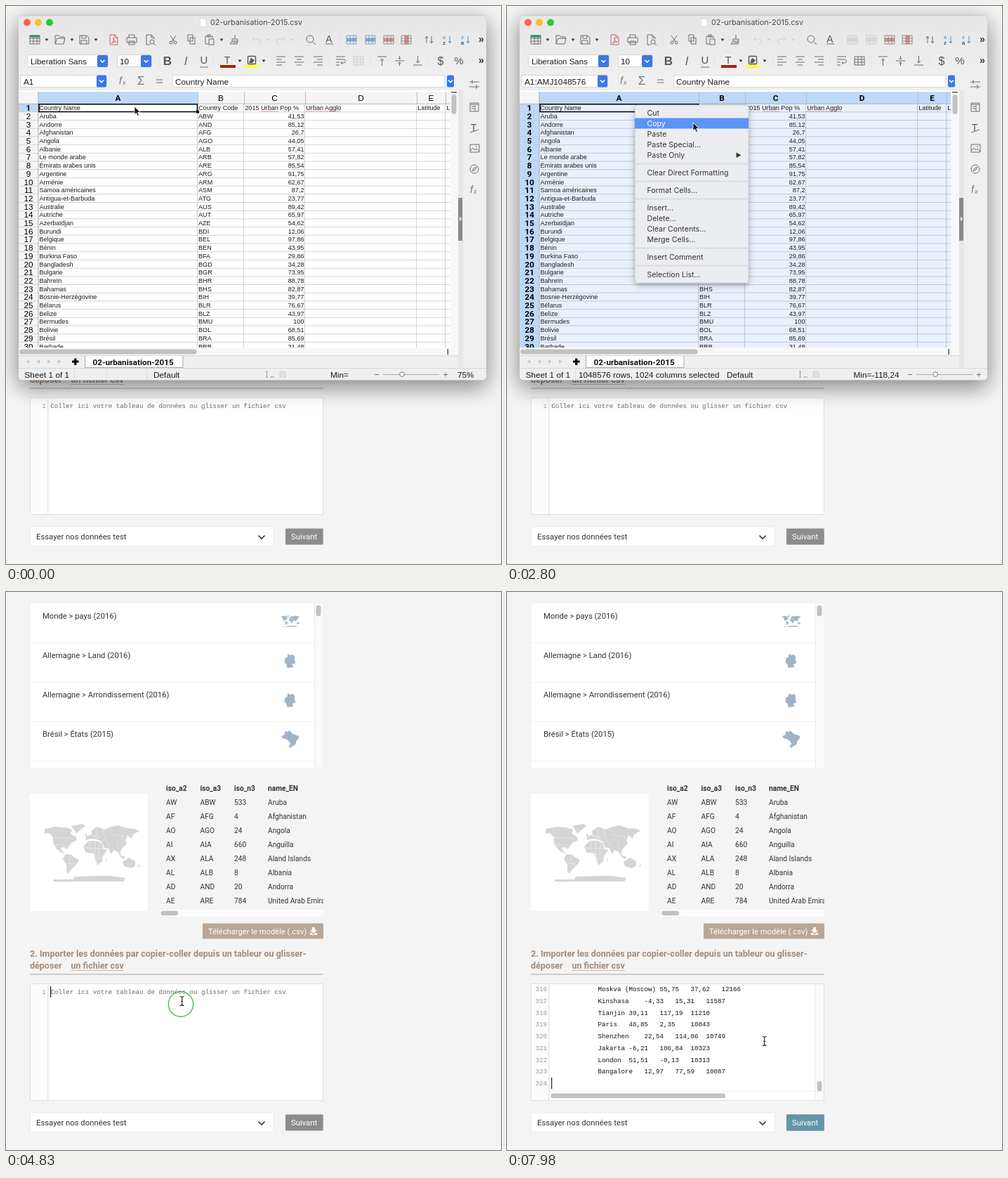
Recreate the animation shown at these times as an HTML page. Size 705 by 794 pixels, loop 8000 ms.

```html
<!DOCTYPE html>
<html lang="fr">
<head>
<meta charset="utf-8">
<title>Copier-coller un tableau</title>
<style>
html, body { margin: 0; width: 100%; height: 100%; overflow: hidden; background: #f4f4f4; }
svg { display: block; width: 705px; height: 794px; }
text { white-space: pre; }
.l { font-family: "Liberation Sans", Arial, sans-serif; }
.r { font-family: Roboto, sans-serif; }
.i { font-family: Inter, sans-serif; }
.m { font-family: "Liberation Mono", monospace; }
.b { font-weight: 700; }
.mid { text-anchor: middle; }
.end { text-anchor: end; }
.win { filter: drop-shadow(0 9px 16px rgba(0,0,0,.38)) drop-shadow(0 0 .6px rgba(0,0,0,.35)); }
.menu { filter: drop-shadow(0 3px 4px rgba(0,0,0,.3)); }
.pointer { animation: move 8s linear infinite; }
@keyframes move {
  0%, 22.5% { transform: translate(183px,143px); animation-timing-function: ease-in-out; }
  31.25%, 42.5% { transform: translate(265px,166px); animation-timing-function: ease-in; }
  54.25% { transform: translate(253px,539px); animation-timing-function: ease-out; }
  57.75%, 74.4% { transform: translate(249px,585px); animation-timing-function: ease-in-out; }
  83.75%, 100% { transform: translate(365px,642px); }
}
</style>
</head>
<body>
<svg id="stage" viewBox="0 0 705 794"></svg>
<script>
const LOOP = 8000;
// Moments of the story, in ms
const SELECT = 600, MENU = 1430, COPY = 3150, FOCUS = 4830, BLINK = 5360, MENU2 = 5530, PASTE = 7480, FILLED = 7620;
let css = '', count = 0;

const rect = (x, y, w, h, fill, more = '') => `<rect x="${x}" y="${y}" width="${w}" height="${h}" fill="${fill}" ${more}/>`;
const line = (d, color = '#6c6c6c', w = 1, more = '') => `<path d="${d}" fill="none" stroke="${color}" stroke-width="${w}" ${more}/>`;
const shape = (d, fill, more = '') => `<path d="${d}" fill="${fill}" ${more}/>`;
const dot = (x, y, r, fill) => `<circle cx="${x}" cy="${y}" r="${r}" fill="${fill}"/>`;
const text = (x, y, size, cls, s, fill = '#1a1a1a') =>
  `<text x="${x}" y="${(y + size * .36).toFixed(2)}" font-size="${size}" class="${cls}" fill="${fill}">${s}</text>`;
const at = (x, y, s) => `<g transform="translate(${x} ${y})">${s}</g>`;
const list = (items, f) => items.map(f).join('');

function during(from, to, content) {
  const name = 'show' + count++, pc = t => t / LOOP * 100 + '%';
  css += `@keyframes ${name}{0%{opacity:${from ? 0 : 1}}${pc(from)}{opacity:1}${pc(to)}{opacity:0}}`;
  return `<g style="animation:${name} 8s step-end infinite">${content}</g>`;
}

// ---------- Web page ----------
const land = [
  'M55 337L70 334 85 335 94 338 92 344 99 348 101 353 93 357 90 361 87 366 83 363 78 364 80 369 85 373 77 370 71 364 67 357 67 349 61 343 55 344z',
  'M93 333L109 330 113 333 104 340 100 344 97 338z',
  'M85 373L93 374 98 378 104 381 101 387 97 391 91 397 89 401 86 397 86 388 81 380z',
  'M110 362L118 354 128 354 136 357 139 366 144 367 138 376 137 383 130 389 127 381 125 372 114 371z',
  'M114 353L114 348 122 345 121 340 130 334 140 338 150 334 160 332 172 336 184 337 190 340 181 345 179 351 173 346 170 353 172 358 165 365 163 370 164 376 158 369 153 367 150 373 146 365 140 364 136 355 130 352 122 351z',
  'M160 374L171 377 167 380z', 'M166 384L175 378 184 383 184 390 178 393 168 390z', 'M187 392L191 387 191 390z',
  'M68 409L96 409 98 405 125 404 150 404 170 407 167 412 68 412z', 'M142 380L144 378 142 385z', 'M112 346L115 343 116 349z'
].join('');
const borders = 'M66 350L92 350 96 353M69 359L88 361M119 355L121 371M127 354L126 370 130 388M133 357L132 376M112 364L140 366M126 379L138 378M138 338L141 352 148 362M150 345L168 348M158 355L160 366M92 376L90 384 95 390M87 387L98 386M120 346L135 350M129 336L131 351';
const germany = 'M-3-10L0-8 4-9 7-6 6-2 8 3 3 5 5 9-4 10-5 5-8 2-7-4-4-5z';
const brazil = 'M-12-4L-8-6-7-11-3-10-1-12 2-9 4-7 13-4 12 0 9 3 8 8 4 10 0 13-2 10 1 7-2 3-6 0-11-1z';

const places = ['Monde > pays (2016)', 'Allemagne > Land (2016)', 'Allemagne > Arrondissement (2016)', 'Brésil > États (2015)'];
const isoRows = ['iso_a2 iso_a3 iso_n3 name_EN', 'AW ABW 533 Aruba', 'AF AFG 4 Afghanistan', 'AO AGO 24 Angola', 'AI AIA 660 Anguilla',
  'AX ALA 248 Aland Islands', 'AL ALB 8 Albania', 'AD AND 20 Andorra', 'AE ARE 784 United Arab Emirates'];
const cities = ['Moskva (Moscow)\t55,75\t37,62\t12166', 'Kinshasa\t-4,33\t15,31\t11587', 'Tianjin\t39,11\t117,19\t11210', 'Paris\t48,85\t2,35\t10843',
  'Shenzhen\t22,54\t114,06\t10749', 'Jakarta\t-6,21\t106,84\t10323', 'London\t51,51\t-0,13\t10313', 'Bangalore\t12,97\t77,59\t10087'];
const untab = s => s.split('\t').reduce((a, b) => a.padEnd((Math.floor(a.length / 4) + 1) * 4, '\u00a0') + b);

const caret = y => rect(63, y, 1.2, 16, '#222');
const brown = '#a38b79';
const slate = '#a0b4c5';

function page() {
  let s = rect(0, 0, 705, 794, '#f4f4f4');
  s += rect(35, 16, 404, 234.5, '#fff') + rect(439, 16, 12, 234.5, '#fafafa') + line('M439.5 16V250.5', '#e8e8e8')
    + rect(441.5, 19, 7, 15.5, '#c1c1c1', 'rx="3.5"') + line('M35 72.5H439M35 128.5H439M35 184.5H439M35 240.5H439', '#f1f1f1');
  s += list(places, (p, k) => text(52, 33.5 + 56 * k, 11.25, 'r', p, '#333'));
  s += `<g transform="translate(381 -32) scale(.198)">${shape(land, slate)}</g>`;
  s += at(404.5, 98, shape(germany, slate)) + at(404.5, 154, shape(germany, slate)) + at(404.5, 209, shape(brazil, slate));
  s += rect(34, 287, 167.5, 167, '#fff') + shape(land, '#d5d5d5') + line(borders, '#fff', .4);
  s += '<clipPath id="table"><rect x="218" y="268" width="234" height="184"/></clipPath><g clip-path="url(#table)">'
    + list(isoRows, (r, k) => {
      const [a, b, c, ...name] = r.split(' ');
      return list([a, b, c, name.join(' ')], (v, n) => text([228, 276.5, 325, 373][n], 279 + 20 * k, 10.2, k ? 'r' : 'r b', v, '#333'));
    }) + '</g>';
  s += rect(219, 452, 233, 10, '#fbfbfb') + rect(220.5, 453.7, 24.5, 6.6, '#c1c1c1', 'rx="3.3"');
  s += rect(280, 471.5, 172, 22, '#b8a798', 'rx="1"') + text(288, 482.5, 11.2, 'r', 'Télécharger le modèle (.csv)', '#fff')
    + shape('M436 477h4v4h3l-5 5-5-5h3zM433 485h2l3 2.5 3-2.5h2v3h-10z', '#fff');
  s += text(34, 514, 12.5, 'r b', '2. Importer les données par copier-coller depuis un tableur ou glisser-', brown)
    + text(34, 531, 12.5, 'r b', 'déposer', brown) + text(92.5, 531, 12.5, 'r b', 'un fichier csv', brown)
    + line('M92.5 538.5H168', '#c9b8ab') + line('M34 544H452', '#aaa5a2');
  s += rect(34.5, 557.5, 417, 166, '#fff', 'stroke="#e0e0e0"') + rect(35, 558, 24.5, 165, '#fcfcfc') + line('M59.8 558V723', '#ddd');
  const placeholder = text(54, 569, 9.18, 'm mid', '1', '#999')
    + text(63.3, 569, 9.18, 'm', 'Coller ici votre tableau de données ou glisser un fichier csv', '#6b6b6b');
  s += during(0, FILLED, placeholder) + during(FOCUS, BLINK, caret(561)) + during(MENU2, FILLED, caret(561));
  const rowY = k => 564.7 + 16.75 * k;
  const pasted = list([...cities, ''], (c, k) => text(57, rowY(k), 9.18, 'm end', 316 + k, '#999')
      + text(129.4, rowY(k), 9.18, 'm', untab(c), '#111'))
    + rect(439, 558, 12, 165, '#fafafa') + line('M438.5 558V723M60 710.5H439', '#efefef')
    + rect(441.8, 696, 6.6, 14.5, '#c1c1c1', 'rx="3.3"') + rect(62.5, 713.5, 248.5, 6.8, '#c1c1c1', 'rx="3.4"') + caret(691);
  s += during(FILLED, LOOP, pasted);
  s += rect(34.5, 741, 346.5, 27.5, '#fff', 'stroke="#ebebeb"') + text(43, 754.5, 11.3, 'r', 'Essayer nos données test', '#333')
    + line('M359.5 753.5l4.5 4.5 4.5-4.5', '#333', 1.6);
  const next = c => rect(398, 743.5, 53.7, 23, c, 'rx="1"') + text(406, 755, 11.3, 'r', 'Suivant', '#fff');
  return s + next('#8c8c8c') + during(FILLED, LOOP, next('#6495a8'));
}

// ---------- Spreadsheet ----------
const icons = {
  grid: 'M-7-6h14v12h-14zM-7-2h14M-7 2h14M-2-6v12M3-6v12',
  folder: 'M-7 6v-12h5l2 2h6v3M-7 6l3-8h11l-2 8z',
  save: 'M-6-6h10l3 3v9h-13zM-3-6v4h6v-4M-4 6v-5h8v5',
  doc: 'M-5-7h7l4 4v10h-11zM2-7v4h4',
  print: 'M-4-3v-4h8v4M-7-3h14v7h-14zM-4 2h8v5h-8z',
  preview: 'M6-1v-2l-4-4h-7v14h5M2-7v4h4M0 3a3 3 0 1 0 6 0a3 3 0 1 0-6 0M5 5l3 3',
  cut: 'M-4-6l6 9M4-6l-6 9M-5 4a2 2 0 1 0 4 0a2 2 0 1 0-4 0M1 4a2 2 0 1 0 4 0a2 2 0 1 0-4 0',
  copy: 'M-5-7h7v9h-7zM-2-3h7v9h-7z',
  paste: 'M-1 6h-5v-11h10v3M-3-7h4v3h-4zM-1-1h7v8h-7z',
  brush: 'M1-7v6M-3-1h8v3h-8zM-3 2l-3 4h10l1-4M-2 4h6',
  undo: 'M-6-1h8a3.5 3.5 0 0 1 0 7M-3-4l-3 3 3 3',
  redo: 'M6-1h-8a3.5 3.5 0 0 0 0 7M3-4l3 3-3 3',
  find: 'M-6-1a5 5 0 1 0 10 0a5 5 0 1 0-10 0M3 3l4 4',
  left: 'M-6-6h13M-6-2h8M-6 2h13M-6 6h8',
  center: 'M-6-6h13M-3-2h7M-6 2h13M-3 6h7',
  right: 'M-6-6h13M-1-2h8M-6 2h13M-1 6h8',
  wrap: 'M-6-6h13M-6-2h11a2 2 0 0 1 0 5h-4M3 1l-2 2 2 2M-6 2h5M-6 6h5',
  top: 'M-6-6h13M.5 7v-9M-2 0l2.5-3 2.5 3',
  middle: 'M-6 0h13M.5-7v5M.5 7v-5M-1.5-4l2 2 2-2M-1.5 4l2-2 2 2',
  bottom: 'M-6 6h13M.5-7v9M-2 0l2.5 3 2.5-3',
  sort: 'M-3 5v-9M-5-2l2-3 2 3M4-5v9M2 2l2 3 2-3',
  down: 'M4-5v9M2 2l2 3 2-3',
  sliders: 'M-7-3h14M-7 4h14M-3-6v6M3 1v6',
  panel: 'M-6-6h12v12h-12zM-6-4h12M1-3v9M-4-1h4M-4 2h4',
  image: 'M-6-5h13v11h-13zM-6 4l4-4 3 3 2-2 4 4M2-2h2',
  compass: 'M-6 0a6 6 0 1 0 12 0a6 6 0 1 0-12 0M-3 3l2-4 4-2-2 4z',
  ibeam: 'M-6-4h3M-4.500-4v8M-6 4h3M0 4h6'
};
const icon = (name, x, y = 48, color = '#6c6c6c') => at(x, y, line(icons[name], color));
const drop = (x, y, c = '#333') => shape(`M${x - 2.5} ${y - 1.5}h5l-2.5 3.5z`, c);
const blueDrop = (x, y, w, h) => rect(x, y, w, h, '#3a79e6', 'rx="2"')
  + line(`M${x + w / 2 - 3} ${y + h / 2 - 1.5}l3 3 3-3`, '#fff', 1.6);

function toolbar() {
  const faint = '#cfcfcf', blue = '#4b8ec6', red = '#c9605c';
  let s = icon('grid', 41) + rect(34, 41.5, 14, 3, '#2f8a78')
    + list(['folder 77', 'save 111', 'print 179', 'preview 205', 'cut 238', 'copy 264', 'paste 290', 'brush 325', 'find 434', 'sort 602'],
      v => icon(...v.split(' ')));
  s += icon('doc', 153, 48, red) + line('M150 53c4-2 4-6 3-8c0 4 2 6 4 6q-4-.5-7 2', red)
    + icon('undo', 357, 48, faint) + icon('redo', 391, 48, faint);
  s += list([58, 94, 128, 307], x => drop(x, 48)) + drop(373, 48, faint) + drop(408, 48, faint);
  s += text(460, 47, 14, 'l mid', 'A', '#555') + line('M455 54h11');
  const inserts = (c, edge) => list([492, 519], x => icon('grid', x, 48, edge) + rect(x - 7, 46, 14, 4, c, 'opacity=".6"'));
  s += during(0, SELECT, inserts(blue, '#7fa3c0')) + during(SELECT, FOCUS, inserts(faint, faint));
  s += list([545, 570], (x, k) => icon('grid', x, 48, '#8a8a8a')
    + (k ? rect(x - 2, 42, 5, 12, red, 'opacity=".6"') : rect(x - 7, 46, 14, 4, red, 'opacity=".6"')));
  s += list([['a', 'z', 628], ['z', 'a', 654]], ([a, b, x]) => text(x - 4, 44, 8, 'l mid', a, blue) + text(x - 4, 52, 8, 'l mid', b) + icon('down', x, 48, blue));
  s += list([48, 78], y => text(673, y - 1, 14, 'l b', '»', '#333'));

  s += rect(30.5, 69.5, 115, 17, '#fff', 'stroke="#d4d4d4" rx="2"') + text(35, 78.5, 11.5, 'l', 'Liberation Sans') + blueDrop(130, 70, 15, 17)
    + rect(158.5, 69.5, 49, 17, '#fff', 'stroke="#d4d4d4" rx="2"') + text(162, 78.5, 11.8, 'l', '10') + blueDrop(192, 70, 15, 17);
  s += text(230, 78, 17, 'l b mid', 'B', '#555') + `<g font-style="italic">${text(256, 78, 17, 'l mid', 'I', '#666')}</g>`
    + text(282, 77, 15, 'l mid', 'U', '#555') + line('M276 87h12');
  s += text(315, 76.5, 14, 'l mid', 'T', '#555') + rect(305, 84, 22, 4, '#a5240b') + drop(333, 78)
    + rect(344.5, 71.5, 11, 11, 'none', 'stroke="#555" stroke-width="1.4" rx="1"') + shape('M346 81l3-7 5 3-3 4z', '#555')
    + rect(340, 84, 20, 4, '#ffff38') + drop(367, 78);
  s += list(['left 391', 'center 417', 'right 444', 'wrap 476', 'top 535', 'middle 560', 'bottom 586'], v => icon(...v.split(' '), 78));
  s += during(0, SELECT, icon('grid', 502, 78, faint)) + during(SELECT, FOCUS, icon('grid', 502, 78));
  s += text(619, 78, 16, 'l mid', '$', '#555') + text(645, 78, 15, 'l mid', '%', '#555');
  s += line('M140 40v16M222 40v16M341 40v16M417 40v16M476 40v16M586 40v16M218 70v16M295 70v16M379 70v16M460 70v16M519 70v16M602 70v16', '#e3e3e3');

  s += rect(20.5, 98.5, 123, 17, '#fff', 'stroke="#d4d4d4" rx="2"') + blueDrop(129, 98.5, 14, 17)
    + during(0, SELECT, text(25, 107.5, 11.8, 'l', 'A1')) + during(SELECT, FOCUS, text(25, 107.5, 11.8, 'l', 'A1:AMJ1048576'));
  const fx = (x, y) => `<g font-style="italic">${text(x, y, 14, 'l', 'f', '#777')}${text(x + 5, y + 3, 9, 'l', 'x', '#777')}</g>`;
  s += fx(161, 106) + text(192, 106, 17, 'l mid', 'Σ', '#777') + line('M214 105h9M214 109h9')
    + rect(237.5, 98.5, 387, 17, '#fff', 'stroke="#dadada"') + text(241, 107.5, 11.8, 'l', 'Country Name') + blueDrop(628, 98.5, 10, 17);

  s += rect(644, 119, 7, 397, '#e8e8e8') + rect(644, 273, 6, 61, '#8a8a8a') + shape('M646 300v6l3-3z', '#fff')
    + icon('sliders', 667, 111) + icon('panel', 667, 144) + text(666, 173, 14, 'l mid', 'T', '#555') + line('M661 180l12-4')
    + icon('image', 667, 202) + icon('compass', 667, 232) + fx(661, 261);
  return s;
}

const countries = `Aruba ABW 41,53|Andorre AND 85,12|Afghanistan AFG 26,7|Angola AGO 44,05|Albanie ALB 57,41|Le monde arabe ARB 57,82
Émirats arabes unis ARE 85,54|Argentine ARG 91,75|Arménie ARM 62,67|Samoa américaines ASM 87,2|Antigua-et-Barbuda ATG 23,77
Australie AUS 89,42|Autriche AUT 65,97|Azerbaïdjan AZE 54,62|Burundi BDI 12,06|Belgique BEL 97,86|Bénin BEN 43,95
Burkina Faso BFA 29,86|Bangladesh BGD 34,28|Bulgarie BGR 73,95|Bahreïn BHR 88,78|Bahamas BHS 82,87|Bosnie-Herzégovine BIH 39,77
Bélarus BLR 76,67|Belize BLZ 43,97|Bermudes BMU 100|Bolivie BOL 68,51|Brésil BRA 85,69|Barbade BRB 31,48`.split(/[|\n]/);
const edges = [46, 273, 339, 426, 585, 626, 632];
const ROW = 11.7, rowMid = k => 145 + ROW * k, rowEnd = k => (150.8 + ROW * k).toFixed(2);

function headers(all) {
  const on = '#bcd9fa', off = '#f5f5f5';
  let s = rect(18, 122, 28, 17, off);
  for (let k = 0; k < 6; k++) {
    const x = edges[k], w = edges[k + 1] - x, hot = all || !k;
    s += rect(x, 122, w, 17, hot ? on : off) + line(`M${x + .5} 122v17`, '#bcbcbc')
      + (k < 5 ? text(x + w / 2, 130.5, 11.8, hot ? 'r b mid' : 'l mid', 'ABCDE'[k], '#000') : '');
  }
  for (let k = 0; k < 30; k++) {
    const hot = all || !k;
    s += rect(18, rowMid(k) - ROW / 2, 28, ROW, hot ? on : off, 'stroke="#c6c6c6" stroke-width=".5"')
      + text(32, rowMid(k), 11.8, hot ? 'r b mid' : 'l mid', k + 1, '#000');
  }
  return s + line('M18 139.3H632M46 122V486', '#b5b5b5');
}

function sheet() {
  const cell = (x, k, s, cls = 'l') => text(x, rowMid(k), 9.1, cls, s);
  let s = '<clipPath id="cells"><rect x="18" y="120" width="614" height="366"/></clipPath><g clip-path="url(#cells)">' + rect(18, 120, 614, 366, '#fff');
  for (let k = 0; k < 30; k++) s += line(`M46 ${rowEnd(k)}H632`, '#c8c8c8', .8);
  s += list(edges.slice(1, 6), x => line(`M${x - .5} 139V486`, '#c4c4c4', .8));
  s += during(SELECT, FOCUS, rect(46, 139, 586, 347, '#3f78e0', 'opacity=".1"'));
  s += list(['Country Name', 'Country Code', '2015 Urban Pop %', 'Urban Agglo', 'Latitude', 'Longitude'], (h, k) => cell(edges[k] + 1.3, 0, h));
  s += line('M364 150H389M427 150H477', '#e0605c', 1, 'stroke-dasharray="1.5 1"');
  s += list(countries, (c, k) => {
    const [, name, code, value] = c.match(/(.+) (\S+) (\S+)$/);
    return cell(47.5, k + 1, name) + cell(274, k + 1, code) + cell(424.5, k + 1, value, 'l end');
  });
  s += during(0, SELECT, headers(false)) + during(SELECT, FOCUS, headers(true));
  return s + line('M47 139.7H272.5V150.5H47z', '#000', 1.6) + during(0, SELECT, rect(271, 148.5, 4, 4, '#000')) + '</g>';
}

function status(x, label, min, bar, knob, note) {
  return (note ? text(102, 524.5, 11.75, 'l', note) : '') + text(x, 524.5, 11.8, 'l', 'Default')
    + icon('ibeam', bar - 152, 524, '#999') + at(bar - 134, 524, `<g transform="scale(.65)">${line(icons.save, '#bbb')}</g>`)
    + text(min, 524.5, 11.8, 'l', label)
    + line(`M${bar - 3} 524.5h6M${bar + 95} 524.5h6M${bar + 98} 521.5v6`, '#777') + line(`M${bar + 9} 524.5h80`, '#aaa')
    + `<circle cx="${knob}" cy="524" r="3.3" fill="#fff" stroke="#777"/>`;
}

function contextMenu() {
  const items = [[152, 'Cut'], [167, 'Copy'], [182, 'Paste'], [197, 'Paste Special...'], [212, 'Paste Only'], [237, 'Clear Direct Formatting'],
    [262, 'Format Cells...'], [287, 'Insert...'], [302, 'Delete...'], [317, 'Clear Contents...'], [332, 'Merge Cells...'],
    [357, 'Insert Comment'], [382, 'Selection List...']];
  const hover = ([y, s]) => rect(182, y - 7.5, 162, 15, '#5a94f6') + text(199.5, y, 10.6, 'i', s, '#fff');
  return '<g class="menu">' + rect(182.2, 141, 162, 253, '#ecedf0', 'rx="4" stroke="#bfc3cb" stroke-width=".7"') + '</g>'
    + list(items, ([y, s]) => text(199.5, y, 10.6, 'i', s, '#333')) + shape('M326.5 208.5v7.5l7-3.75z', '#333')
    + line('M182 224.5H344M182 249.5H344M182 274.5H344M182 344.5H344M182 369.5H344', '#d6d8dc', 1.3)
    + during(1850, 2220, hover(items[0])) + during(2220, COPY, hover(items[1]));
}

function spreadsheet() {
  let s = '<linearGradient id="bar" x2="0" y2="1"><stop stop-color="#e6e6e6"/><stop offset=".16" stop-color="#efefef"/></linearGradient>'
    + '<g class="win">' + rect(18, 13.5, 666, 519, 'url(#bar)', 'rx="5"') + '</g>'
    + dot(30, 23.5, 5, '#fc5f57') + dot(46, 23.5, 5, '#fdbd2e') + dot(62, 23.5, 5, '#2ac840')
    + at(280.5, 23.5, shape('M-4-5.5h6l3 3v8.5h-9z', '#fff', 'stroke="#c8c8c8" stroke-width=".6"'))
    + text(291, 23.5, 10.8, 'i', '02-urbanisation-2015.csv', '#4a4a4a');
  s += toolbar() + sheet();
  s += rect(632, 120, 12, 378, '#f8f8f8') + rect(634.5, 126, 7, 28, '#c1c1c1', 'rx="3.5"') + rect(634, 122, 8, 1.5, '#555')
    + rect(18, 486, 614, 11.5, '#f8f8f8') + rect(19, 488.5, 252.5, 7, '#c1c1c1', 'rx="3.5"') + rect(628.5, 488, 1.5, 8, '#555');
  s += line('M18 497.5H644', '#d6d6d6') + list([31, 46, 61, 76], (x, k) => shape(k < 2 ? `M${x + 2} 503v6l-4-3z` : `M${x - 2} 503v6l4-3z`, '#c6c6c6'))
    + line('M94 506h9.5M98.75 501.5v9.5', '#000', 3.2) + rect(112, 498, 140, 16.5, '#fff') + line('M112.5 498v16.5h139.5v-16.5', '#aaa')
    + text(123.5, 506.5, 11.7, 'r b', '02-urbanisation-2015', '#111');
  s += line('M18 515.5H684', '#d6d6d6') + text(26.5, 524.5, 11.8, 'l', 'Sheet 1 of 1') + line('M97.5 518v13', '#d8d8d8')
    + during(0, SELECT, status(210, 'Min=', 462, 528, 564) + text(643, 524.5, 11.8, 'l', '75%') + line('M143.5 518v13M200.5 518v13', '#d8d8d8'))
    + during(SELECT, FOCUS, status(313, 'Min=-118,24', 493.5, 574, 610, '1048576 rows, 1024 columns selected'));
  return s + during(MENU, COPY, contextMenu());
}

// ---------- Browser menu ----------
function pasteMenu() {
  const items = [[539, 'Emoji et symboles'], [565, 'Annuler', 1], [581, 'Rétablir', 1], [607, 'Couper', 1], [623, 'Copier', 1], [639, 'Coller'],
    [655, 'Coller en adaptant le style'], [671, 'Tout sélectionner'], [696.5, 'Paramètres linguistiques'], [712.5, "Sens de l'écriture"], [783, 'Inspecter']];
  const extras = text(284, 739, 11.2, 'i', "I don't fret about crumbs", '#fff') + text(284, 757, 11.2, 'i', 'Save To Satchel', '#fff')
    + dot(273.5, 739.5, 5, '#9a6a43') + rect(267.5, 751, 12, 12, '#e5566a');
  return '<g class="menu">' + rect(249, 527.5, 223.5, 280, '#8b8b8b', 'rx="5" stroke="#a2a2a2" stroke-width=".7"') + '</g>'
    + line('M249 552.5H472M249 594.5H472M249 684H472M249 725.5H472M249 770.5H472', '#b3b3b3', 1.6)
    + during(6450, PASTE, rect(249, 630.5, 223, 16.5, '#679dfb'))
    + list(items, ([y, s, off]) => text(267, y, 11.2, 'i', s, off ? '#c3c3c3' : '#fff')) + extras
    + list([712.5, 739], y => shape(`M454 ${y - 4}v8l8-4z`, '#fff'));
}

function pointer() {
  const arrow = shape('M0 0v11.5l2.6-2.4 1.9 4.4 2-.9-1.9-4.2h3.7z', '#000', 'stroke="#fff" stroke-width=".9"');
  const beam = at(1.7, -3, line('M-3-6.5q3 0 3 2v9q0 2-3 2M3-6.5q-3 0-3 2v9q0 2 3 2M-1.5.5h3', '#222', 1.1));
  const ring = '<g fill="none"><circle cy="1.5" r="16.6" stroke="#fff" stroke-opacity=".8"/><circle cy="1.5" r="17.7" stroke="#55b858" stroke-width="1.4"/></g>';
  return '<g class="pointer">' + list([MENU, 3080, FOCUS, MENU2, 7400], t => during(t, t + 270, ring))
    + during(0, FOCUS, arrow) + during(MENU2, PASTE, arrow) + during(FOCUS, MENU2, beam) + during(PASTE, LOOP, beam) + '</g>';
}

document.getElementById('stage').innerHTML = page() + during(0, FOCUS, spreadsheet()) + during(MENU2, PASTE, pasteMenu()) + pointer();
document.head.appendChild(document.createElement('style')).textContent = css;
</script>
</body>
</html>
```
